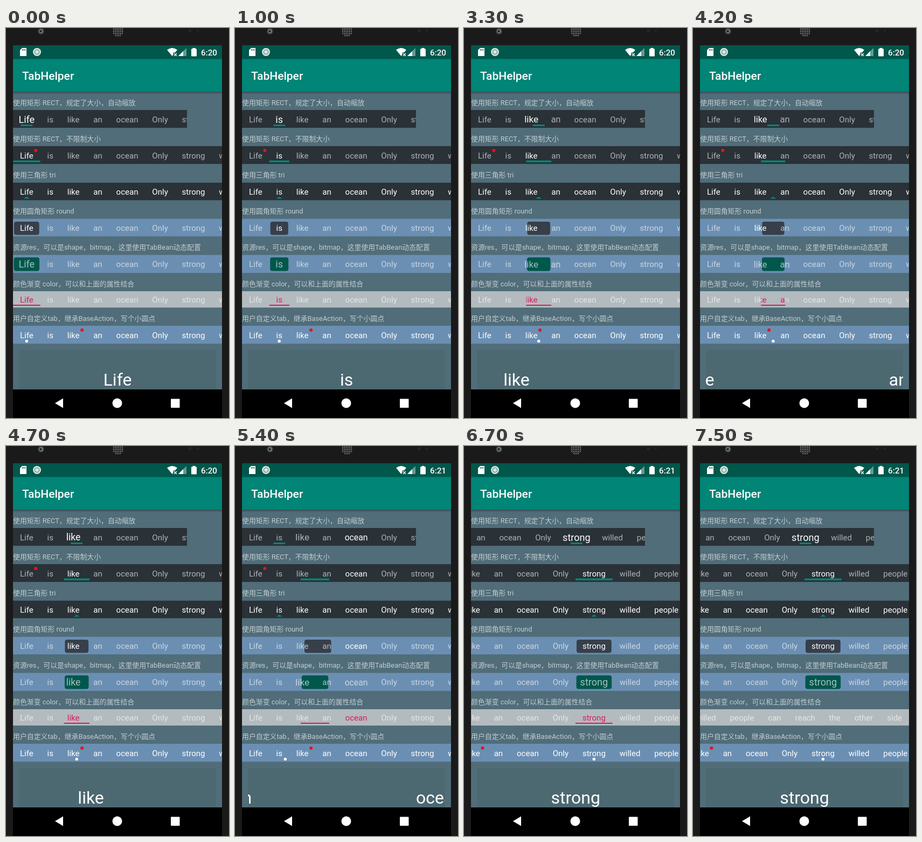
An HTML page with a canvas for the animation above (8 s loop, 414 px wide and 723 px high).

```html
<!DOCTYPE html>
<html lang="zh">
<head>
<meta charset="utf-8">
<style>
  html, body { margin: 0; width: 100%; height: 100%; overflow: hidden; background: #1a1a1a; }
  canvas { display: block; width: 414px; height: 723px; }
</style>
</head>
<body>
<canvas id="stage" width="414" height="723"></canvas>
<script>
const ctx = document.getElementById('stage').getContext('2d');
const LOOP = 8000, STEP = 100;
const LEFT = 13, RIGHT = 401, PAD = 12.9, SIZE = 15.05;
const TEAL = '#008577', DARK_TEAL = '#00574b', PINK = '#d81b60', RED = '#e5141c';
const SLATE = '#2a3137', BLUE = '#6b8fb3', DIM = 'rgba(255,255,255,.63)';
const font = (size, weight = 400) => `${weight} ${size}px Roboto, "Noto Sans CJK SC", "Noto Sans CJK", sans-serif`;

const clamp = (v, lo = 0, hi = 1) => Math.min(hi, Math.max(lo, v));
const lerp = (a, b, k) => a + (b - a) * k;
const smooth = k => (1 - Math.cos(Math.PI * clamp(k))) / 2;
const quintOut = k => 1 - (1 - clamp(k)) ** 5;
const swing = tension => k => {
  const half = s => s * s * ((tension + 1) * s - tension) / 2;
  return k < .5 ? half(2 * k) : 1 - half(2 - 2 * k);
};

// Tab cells, measured relative to the start of the strip
ctx.font = font(SIZE);
let edge = 0;
const tabs = 'Life is like an ocean Only strong willed people can reach the other side'.split(' ').map(word => {
  const left = edge;
  edge += ctx.measureText(word).width + 2 * PAD;
  return { word, left, right: edge, mid: (left + edge) / 2 };
});
const stripWidth = edge;

const rows = [
  { label: '使用矩形 RECT，规定了大小，自动缩放', y: 152, h: 33, bg: SLATE, end: 336, zoom: true, curve: swing(7.6),
    mark: (a, b) => box((a + b) / 2 - 11, 179, 22, 3, TEAL) },
  { label: '使用矩形 RECT，不限制大小', y: 219, h: 33, bg: SLATE, badge: 0,
    mark: (a, b) => box(a, 245.5, b - a, 3.5, TEAL) },
  { label: '使用三角形 tri', y: 286.5, h: 33, bg: SLATE, bright: true, curve: swing(7.6),
    mark: (a, b) => { const x = (a + b) / 2; poly(TEAL, x - 5.5, 316.5, x - 1, 313, x + 1, 313, x + 5.5, 316.5); } },
  { label: '使用圆角矩形 round', y: 353.5, h: 33, bg: BLUE, curve: k => k ** 1.1,
    mark: (a, b) => box(a + 2, 359, b - a - 4, 24.5, '#363f4a', 4) },
  { label: '资源res，可以是shape，bitmap，这里使用TabBean动态配置', y: 420.5, h: 33.5, bg: BLUE, zoom: true, active: DIM,
    mark: (a, b) => box(a + 1.6, 425.2, b - a - 3.2, 25.2, DARK_TEAL, 4) },
  { label: '颜色渐变 color，可以和上面的属性结合', y: 488, h: 30.5, bg: '#b3bbbf', active: PINK, reveal: true,
    mark: (a, b) => box(a, 513, b - a, 2, PINK) },
  { label: '用户自定义tab，继承BaseAction，写个小圆点', y: 552, h: 33.5, bg: BLUE, bright: true, badge: 2, curve: swing(6.1),
    mark: (a, b) => disc((a + b) / 2, 580.5, 2.7, '#fff') },
];

const taps = [[801, 0, 1], [1464, 1, 2], [5339, 2, 4], [5910, 4, 5], [6510, 5, 6]];
const TAP_MS = 190, PAGE_MS = 243;

function dragAt(t) {
  if (t < 4100) return .51 * smooth((t - 2800) / 900) + .03 * clamp((t - 3700) / 200);
  return .54 * (1 - smooth((t - 4100) / 900));
}

function stateAt(t) {
  if (t >= 2800 && t < 5000) {
    const k = dragAt(t);
    return { from: 2, to: 3, k, drag: true, page: 2 + k, selected: 2 };
  }
  const [start, from, to] = taps.findLast(tap => tap[0] <= t) || [-1000, 0, 0];
  return { from, to, k: clamp((t - start) / TAP_MS), drag: false, selected: to,
    page: lerp(from, to, quintOut((t - start) / PAGE_MS)) };
}

function box(x, y, w, h, color, r = 0) {
  ctx.fillStyle = color;
  ctx.beginPath();
  ctx.roundRect(x, y, w, h, r);
  ctx.fill();
}
function disc(x, y, r, color) {
  ctx.fillStyle = color;
  ctx.beginPath();
  ctx.arc(x, y, r, 0, 2 * Math.PI);
  ctx.fill();
}
function poly(color, ...p) {
  ctx.fillStyle = color;
  ctx.beginPath();
  for (let i = 0; i < p.length; i += 2) ctx.lineTo(p[i], p[i + 1]);
  ctx.fill();
}
function text(str, x, y, size, color, align = 'left', weight = 400) {
  ctx.font = font(size, weight);
  ctx.fillStyle = color;
  ctx.textAlign = align;
  ctx.fillText(str, x, y);
}
function clipped(x, y, w, h, draw) {
  ctx.save();
  ctx.beginPath();
  ctx.rect(x, y, w, h);
  ctx.clip();
  draw();
  ctx.restore();
}

function drawPhone() {
  box(0, 0, 414, 723, '#1a1a1a');
  disc(65, 6, 6, '#3a3a3c');
  disc(65, 6, 4, '#77787c');
  disc(64.5, 6, 2.2, '#23232e');
  disc(208, 6, 10, '#2c2c2c');
  for (let x = -8; x <= 8; x += 4)
    for (let y = -8; y <= 8; y += 4)
      if (x * x + y * y < 90) disc(208 + x, 6 + y, 1.2, '#6c6c6c');
  disc(342, 5, 3, '#262626');
  disc(356, 5, 2, '#262626');
  box(LEFT, 32, RIGHT - LEFT, 638, '#506d79');
  box(LEFT, 670, RIGHT - LEFT, 53, '#000');
  poly('#fff', 91, 695.5, 106, 686.5, 106, 704.5);
  disc(206.5, 695.5, 9, '#fff');
  box(306, 687.5, 16.5, 16.5, '#fff', 1);
}

function drawBars(t) {
  const shade = ctx.createLinearGradient(0, 118, 0, 123);
  shade.addColorStop(0, 'rgba(0,0,0,.3)');
  shade.addColorStop(1, 'rgba(0,0,0,0)');
  box(LEFT, 118, RIGHT - LEFT, 5, shade);
  box(LEFT, 32, RIGHT - LEFT, 26, DARK_TEAL);
  box(LEFT, 57.5, RIGHT - LEFT, 60.5, TEAL);
  text('TabHelper', 30, 96, 21, '#fff', 'left', 500);
  text(t < 5400 ? '6:20' : '6:21', 392, 50.5, 15.2, '#fff', 'right', 500);

  poly('#fff', 30, 37, 38, 37, 38, 52, 26, 52, 26, 41);
  for (let x = 30; x < 37; x += 2.5) box(x, 39, 1.2, 3, DARK_TEAL);
  disc(57.5, 44.5, 7.5, '#dce8e6');
  disc(57.5, 44.5, 5.3, '#8fb0aa');
  disc(57.5, 44.5, 3, '#dce8e6');

  ctx.fillStyle = '#fff';
  ctx.beginPath();
  ctx.moveTo(308.5, 52);
  ctx.lineTo(299, 40.5);
  ctx.quadraticCurveTo(308.5, 33.5, 318, 40.5);
  ctx.fill();
  box(310.5, 45.5, 8, 8, DARK_TEAL);
  ctx.strokeStyle = '#fff';
  ctx.lineWidth = 1.4;
  ctx.beginPath();
  ctx.moveTo(312, 47); ctx.lineTo(317, 52);
  ctx.moveTo(317, 47); ctx.lineTo(312, 52);
  ctx.stroke();
  poly('rgba(255,255,255,.4)', 335, 37, 335, 52, 320, 52);
  poly('#fff', 329, 43, 329, 52, 320, 52);
  box(344, 38.5, 10, 14, '#fff', 1);
  box(346.5, 37, 5, 2, '#fff');
}

function drawRow(row, s, t) {
  const { y, h, end = RIGHT, active = '#fff', curve = smooth } = row;
  const view = end - LEFT, max = stripWidth - view;
  const target = i => clamp(tabs[i].left - view / 2, 0, max);
  const eased = s.drag ? s.k : smooth(s.k);
  let scroll = s.drag ? 0 : lerp(target(s.from), target(s.to), smooth((s.k - .35) / .65));
  if (row.reveal) scroll = lerp(scroll, max, clamp((t - 7300) / 200));
  const origin = LEFT - scroll;

  const q = s.drag ? s.k : curve(s.k);
  const a = origin + lerp(tabs[s.from].left, tabs[s.to].left, q);
  const b = origin + lerp(tabs[s.from].right, tabs[s.to].right, q);
  const fade = row.reveal && s.drag;

  const drawWords = colorOf => tabs.forEach((tab, i) => {
    const weight = i === s.to ? eased : i === s.from ? 1 - eased : 0;
    const size = SIZE * (row.zoom ? 1 + .2 * weight : 1);
    text(tab.word, origin + tab.mid, y + h / 2 + .8 + size * .35, size, colorOf(i), 'center');
  });

  text(row.label, LEFT, y - 9.3, 12.88, '#c3cdd1');
  clipped(LEFT, y, view, h, () => {
    box(LEFT, y, view, h, row.bg);
    row.mark(a, b);
    drawWords(i => row.bright ? '#fff' : i === s.selected && !fade ? active : DIM);
    if (fade) clipped(a, y, b - a, h, () => {
      box(a, y, b - a, h - 6, row.bg);
      drawWords(() => PINK);
    });
    if (row.badge !== undefined) disc(origin + tabs[row.badge].right - 8.3, y + 8, 3, RED);
  });
}

function drawPager(page) {
  box(24, 597, 366, 73, '#4c6871');
  clipped(24, 597, 366, 73, () =>
    tabs.forEach((tab, i) => text(tab.word, 207 + 366 * (i - page), 663, 32, '#fff', 'center')));
}

// The screen refreshes ten times a second
function frame(now) {
  const t = Math.floor((now % LOOP) / STEP) * STEP;
  const s = stateAt(t);
  drawPhone();
  drawBars(t);
  rows.forEach(row => drawRow(row, s, t));
  drawPager(s.page);
  requestAnimationFrame(frame);
}
requestAnimationFrame(frame);
</script>
</body>
</html>
```
